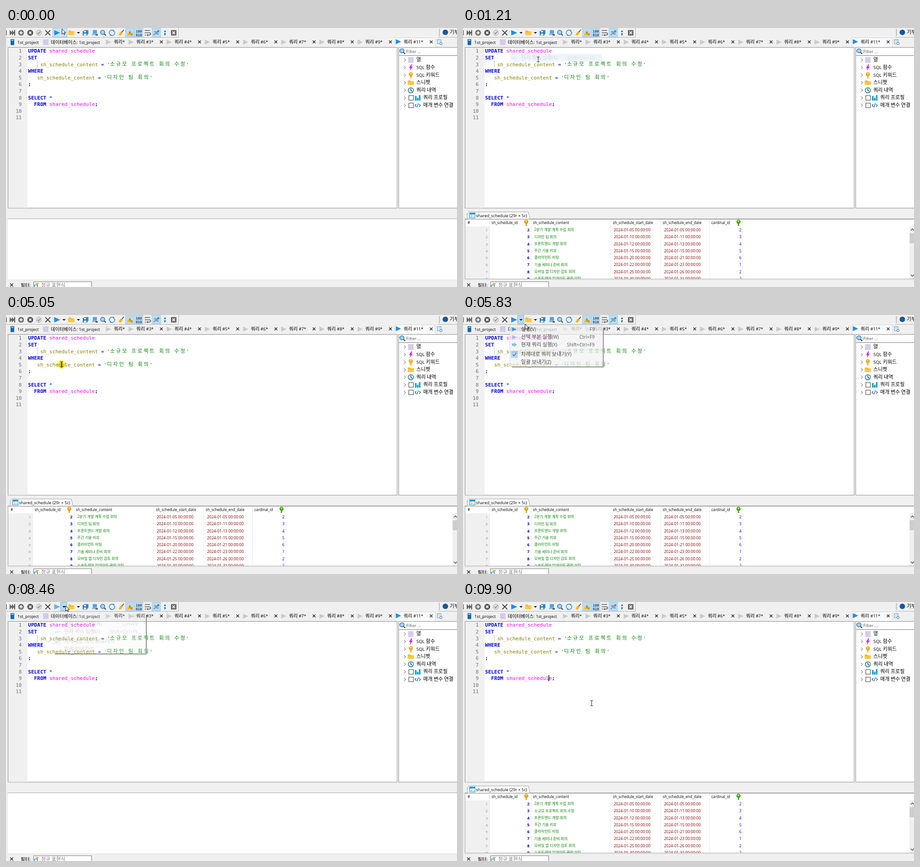
Recreate the animation shown at these times as an HTML page. Size 987 by 568 pixels, loop 9.93 s.

```html
<!DOCTYPE html>
<html lang="ko">
<head>
<meta charset="utf-8">
<title>Query editor</title>
<style>
  html, body { margin: 0; width: 100%; height: 100%; overflow: hidden; background: #f0f0f0; }
  svg { display: block; width: 100%; height: 100%; }
  text { font-family: "Open Sans", "Noto Sans CJK KR", "Noto Sans CJK", sans-serif; white-space: pre; }
  .code { font: 11px "DejaVu Sans Mono", "Noto Sans CJK KR", monospace; letter-spacing: .03px; }
  .kw { font-weight: bold; fill: #0000f0; }
  .op { fill: #0000f0; }
  .tbl { fill: #f0f; }
  .col { fill: #808000; }
  .str { fill: #008000; }
  .ko { font-family: "Noto Sans CJK KR", "Noto Sans CJK", sans-serif; letter-spacing: 3.12px; word-spacing: 1px; }
  .bits { font: bold 7.5px "DejaVu Sans Mono", monospace; }
  #halo { mix-blend-mode: multiply; }
</style>
</head>
<body>
<svg id="stage" viewBox="0 0 987 568"></svg>
<script>
const LOOP = 9930;

// ---------- drawing helpers ----------
const rect = (x, y, w, h, fill, more = '') =>
  `<rect x="${x}" y="${y}" width="${w}" height="${h}" fill="${fill}" ${more}/>`;
const path = (d, fill, stroke = 'none', w = 1) =>
  `<path d="${d}" fill="${fill}" stroke="${stroke}" stroke-width="${w}"/>`;
const line = (d, stroke, w = 1) => path(d, 'none', stroke, w);
const circle = (x, y, r, fill, more = '') =>
  `<circle cx="${x}" cy="${y}" r="${r}" fill="${fill}" ${more}/>`;
const cross = (x, y, r, color, w) =>
  line(`M${x - r} ${y - r}l${2 * r} ${2 * r}m0 ${-2 * r}l${-2 * r} ${2 * r}`, color, w);
const at = (x, y, body) => `<g transform="translate(${x} ${y})">${body}</g>`;
const plain = (x, y, s, size, fill = '#000', more = '') =>
  `<text x="${x}" y="${y}" font-size="${size}" fill="${fill}" ${more}>${s}</text>`;
// Hangul runs are set a little larger than Latin ones
const label = (x, y, s, size = 9.4, fill = '#000', more = '') =>
  plain(x, y, s.replace(/[가-힣]+/g, run => `<tspan font-size="${size * 1.13}">${run}</tspan>`), size, fill, more);

// ---------- icons, centred on 0,0 ----------
const play = (color, s = 1) => path(`M${-6 * s} ${-6 * s}L${7 * s} 0L${-6 * s} ${6 * s}z`, color);
const folder = path('M-6.5-5h5l1.5 2h6.5v8h-13z', '#fbb817') + path('M-6.5-1.5h13v6.5h-13z', '#ffc933');
const stack = [-6, -1.8, 2.4].map(y => rect(-6, y, 12, 3.6, '#cfc4e8')).join('');
const lens = circle(-1, -1, 4.6, '#9fd4f7', 'stroke="#3b6f9e" stroke-width="1.5"') + line('M2.5 2.5L6 6', '#345', 2.2);
const drop = path('M-3.5-1.5h7L0 2z', '#111');
const key = color => circle(0, -2, 4.5, color) + circle(0, -3.2, 1.3, '#fff') + rect(-1.5, 1, 3, 6, color);
const bolt = path('M1-7L-4 1h3L-2 7L4-2H1L3-7z', '#e815e8');
const clock = circle(0, 0, 5.7, '#eaf8fc', 'stroke="#117a9c" stroke-width="1.5"') + line('M0-4V0L3 2', '#234', 1.3);
const checkbox = rect(-5, -5, 10, 10, '#fff', 'stroke="#333"');
const bars = rect(-6, -4, 3.5, 10, '#12a5d0') + rect(-1.7, 0, 3.5, 6, '#12a5d0') + rect(2.6, -6, 3.5, 12, '#12a5d0');
const tags = line('M-3-3L-6 0L-3 3M3-3L6 0L3 3M1.5-4.5L-1.5 4.5', '#1b5fa8', 1.3);
const refresh = line('M-5 3A5.8 5.8 0 0 1 3-5M5-3A5.8 5.8 0 0 1-3 5', '#2289d5', 1.5) +
  path('M1-6.5l4.5 1l-2.5 3.5zM-1 6.500l-4.500-1l2.500-3.500z', '#2289d5');

function toolbar() {
  const on = x => rect(x, .5, 19, 19, '#b9dcf5', 'stroke="#a3d0f2"');
  const icons = [
    [14, line('M5-6V6', '#555', 2) + path('M-6-6L0 0L-6 6zM-1-6L5 0L-1 6z', '#666')],
    [33, circle(0, 0, 6.5, '#777') + line('M-3.5 0h7M0-3.5v7', '#fff', 1.8)],
    [53, circle(0, 0, 6.5, '#555') + cross(0, 0, 2.5, '#fff', 1.8)],
    [72, circle(0, 0, 6, '#ddd', 'stroke="#aaa"') + line('M-3 0L-1 2.5L3.5-3', '#888', 1.5)],
    [91.5, cross(0, 0, 5.5, '#444', 1.8)],
    [143, folder], [158.5, drop],
    [174, rect(-3, -6, 9.5, 9, '#3a94d8') + rect(-6, -4, 10, 10, '#1673bd') + rect(-3.5, -4, 5, 3, '#fff') + rect(-4, 1.5, 6, 4.5, '#d7ecfa')],
    [194, rect(-4, -6, 9, 8, '#4fa5e5') + rect(-6, 2, 10, 3, '#8db4d5') + rect(2, 3, 5, 3, '#357')],
    [212.5, lens],
    [232, refresh],
    [252, line('M6-6.5L1-1', '#8b5a24', 2) + path('M-1-3L3 1L-1 6L-6 5z', '#f4b41f')],
    [271, path('M0-6L6.5 5.5h-13z', '#f9b51b') + rect(-.7, -2, 1.5, 4, '#654') + rect(2, 1, 4, 5, '#e08f14')],
    [309.5, line('M-6-5h12M-6 0h10q3 0 3 2.5T4 5H-1M-6 5h3', '#555', 1.5) + path('M-2 5l3-2.5v5z', '#555')],
    [329, line('M-6 5L6-5M-5-2h5M0 2.5h5', '#456b8d', 1.4) + circle(4, -3, 2, 'none', 'stroke="#456b8d"')],
    [348, circle(0, -3, 2, '#0c8ca5') + path('M-2 1h4q0 4-3 5l-1-1q1-1 1-2h-1z', '#0c8ca5')],
    [367, rect(-6, -6, 12, 12, '#666', 'rx="1"') + cross(0, 0, 2.8, '#fff', 1.8)],
  ];
  const bits = (y, s) => `<text class="bits" x="284" y="${y}" fill="#2c4258">${s}</text>`;
  return rect(0, 5, 1.3, 11, '#555') + on(261.5) + on(280.5) + on(319.5) +
    '<g id="hover">' + rect(102.5, .5, 31, 19, '#cce5f8', 'stroke="#98c9ef"') + '</g>' +
    '<g id="pressed">' + rect(119.5, .5, 14, 19, '#b5d9f5', 'stroke="#86bdea"') + '</g>' +
    `<g id="run">${at(111.5, 10.5, play('#1c8fe3'))}</g>` + at(127, 10.5, drop) +
    icons.map(([x, body]) => at(x, 10.5, body)).join('') + bits(9.5, '100') + bits(17.5, '010') +
    line('M0 20.5H377.5V0M946 20.5H987', '#b5b5b5') +
    line('M948.5 2V18', '#aaa', 1.5) + circle(961.5, 9.5, 6, '#14599f') + label(971, 13, '기부', 9.6);
}

function tabs() {
  let out = rect(851.5, 21.5, 88, 21, '#fafafa', 'stroke="#d5d5d5"');
  out += rect(10, 24.5, 8, 13, '#1668b0', 'rx="1"') + rect(11.5, 26, 5, 2, '#9fd3ff') + label(25, 34.5, '1st_project', 9.2);
  out += at(87, 31, stack) + label(98, 34.5, '데이터베이스: 1st_project', 9.1);
  out += at(224, 31, play('#c9c9c9', .9)) + label(236, 34, '쿼리*', 9.2);
  for (let n = 3; n < 10; n++) {
    const x = 83.55 * (n - 3);
    out += at(273.5 + x, 31, play('#c9c9c9', .9)) + label(285 + x, 34, `쿼리 #${n}*`, 9.2) + cross(340 + x, 30.5, 3, '#222', 1.4);
  }
  return out + at(858.5, 30, play('#1c8fe3', .9)) + label(870, 33.5, '쿼리 #11*', 9.2) + cross(930.5, 30.5, 3, '#222', 1.4) +
    rect(944, 25.5, 8, 9, '#fff', 'stroke="#4a90c8"') + line('M945.5 28h5M945.5 31h5', '#8ab') + circle(952, 34, 2.5, '#fff', 'stroke="#357"');
}

const CELL = 6.65;
const lineY = n => 54.3 + 14.6 * (n - 1);

function editor() {
  const tokens = [
    [1, 0, 'kw', 'UPDATE'], [1, 7, 'tbl', 'shared_schedule'],
    [2, 0, 'kw', 'SET'],
    [3, 4, 'col', 'sh_schedule_content'], [3, 24, 'op', '='], [3, 26, 'str', "'"],
    [3, 27, 'str ko', '소규모 프로젝트 회의 수정'], [3, 52, 'str', "'"],
    [4, 0, 'kw', 'WHERE'],
    [5, 3, 'col', 'sh_schedule_content'], [5, 23, 'op', '='], [5, 25, 'str', "'"],
    [5, 26, 'str ko', '디자인 팀 회의'], [5, 40, 'str', "'"],
    [6, 0, 'kw', ';'],
    [8, 0, 'kw', 'SELECT'], [8, 7, 'op', '*'],
    [9, 2, 'kw', 'FROM'], [9, 7, 'tbl', 'shared_schedule'], [9, 22, 'kw', ';'],
  ];
  let out = rect(4.5, 42.5, 851.5, 352.5, '#fff', 'stroke="#8a8a8a"') + rect(5, 43, 42, 351.5, '#f0f0f0');
  for (let n = 1; n < 12; n++) out += `<text class="code" x="34.5" y="${lineY(n)}" text-anchor="end" fill="#707070">${n}</text>`;
  out += line('M68.5 72V87', '#bbb');
  return out + tokens.map(([n, col, cls, s]) => {
    const rise = cls.includes('ko') ? .8 : 0;
    return `<text class="code ${cls}" x="${48.3 + col * CELL}" y="${lineY(n) - rise}">${s}</text>`;
  }).join('');
}

function sidePanel() {
  const rows = [['열', stack], ['SQL 함수', bolt], ['SQL 키워드', key('#f7a813')], ['스니펫', folder],
    ['쿼리 내역', clock], ['쿼리 프로필', bars, true], ['매개 변수 연결', tags, true]];
  return rect(859.5, 42.5, 140, 352.5, '#fff', 'stroke="#8a8a8a"') + line('M860 60.5H987', '#707070') +
    at(867.5, 51, lens) + label(876, 54.5, 'Filter ...', 9.4, '#555') +
    rows.map(([s, icon, check], i) => {
      const y = 70.2 + 16.6 * i;
      return line(`M871 ${y - 3.5}l3.5 3.5l-3.5 3.5`, '#888', 1.2) +
        (check ? at(886.5, y, checkbox) : '') + at(check ? 901 : 886, y, icon) + label(check ? 913 : 898, y + 3.2, s, 9.8);
    }).join('');
}

function results() {
  const rows = [
    [2, '2분기 개발 계획 수립 회의', '05', '05', 2], [3, '', '10', '11', 3],
    [4, '프론트엔드 개발 회의', '12', '13', 4], [5, '주간 기술 리뷰', '15', '15', 5],
    [6, '클라이언트 미팅', '20', '21', 6], [7, '기술 세미나 준비 회의', '22', '23', 1],
    [8, '모바일 앱 디자인 검토 회의', '25', '26', 2], [9, '소프트웨어 업데이트 관련 미팅', '30', '31', 2],
  ];
  const day = (x, y, d) => plain(x, y, `2024-01-${d} 00:00:00`, 8.5, '#800000');
  const end = 'text-anchor="end"';
  let out = path('M9.5 418.5V407L13 403.5H143L146.5 418.5', '#fff', '#a0a0a0') +
    rect(14.5, 405.5, 12, 11, '#fff', 'stroke="#1679b8"') + rect(14, 405, 13, 4, '#19a0dc') + line('M18.5 409V417M14 413H27', '#7bb8dd') +
    plain(28.5, 415, 'shared_schedule (29r × 5c)', 9.05) +
    rect(4.5, 419.5, 984, 131, '#fff', 'stroke="#a0a0a0"') + rect(5, 435, 53, 115, '#f0f0f0') +
    line('M58.5 420V550M150.5 420V550M323.5 420V550M432.5 420V550M539.5 420V550M612.5 420V550', '#ececec') +
    [[10, '#'], [62.5, 'sh_schedule_id'], [153, 'sh_schedule_content'], [328, 'sh_schedule_start_date'],
      [437, 'sh_schedule_end_date'], [543.5, 'cardinal_id']].map(([x, s]) => plain(x, 430.3, s, 8.15)).join('') +
    at(138.5, 427, key('#f0a010')) + at(603, 427, key('#4aa814'));
  out += '<g clip-path="url(#gridClip)">' + rows.map(([id, s, from, to, ref], i) => {
    const y = 446.1 + 15.25 * i;
    return plain(54, y, i + 1, 8, '#888', end) + plain(145.5, y, id, 8.8, '#0000d0', end + ' font-weight="bold"') +
      `<text ${i === 1 ? 'id="edited"' : ''} x="156" y="${y - .7}" font-size="8.05" fill="#008000">${s}</text>` +
      day(330, y, from) + day(440, y, to) + plain(609.5, y, ref, 8.8, '#0000e0', end);
  }).join('') + '</g>';
  return out + rect(977, 435, 10, 115, '#f0f0f0') + rect(977.5, 450, 10, 22, '#cdcdcd') +
    line('M980 444l3.5-3.5l3.5 3.5M980 541l3.5 3.5l3.5-3.5', '#444', 1.3);
}

const lower = rect(2.5, 418.5, 990, 134, '#fff', 'stroke="#dcdcdc"') + line('M4 418.5H987', '#a5a5a5');
const filterBar = rect(0, 553, 987, 15, '#f0f0f0') + cross(12.5, 563.5, 3.3, '#222', 1.4) + label(32, 567.5, '필터:', 9.5) +
  rect(60.5, 556.5, 127, 20, '#fff', 'stroke="#7a7a7a"') + path('M64 559h9l-3.5 4v5h-2v-5z', '#f5b13d') +
  rect(62.5, 563.5, 6, 6, '#fff', 'stroke="#1a9ad6" stroke-width="1.5"') + label(77, 567.8, '정규 표현식', 9.7, '#777');

// ---------- menu ----------
const ITEMS = [[31.5, '실행(V)', 'F9'], [48.5, '선택 부분 실행(W)', 'Ctrl+F9'], [65, '현재 쿼리 실행(X)', 'Shift+Ctrl+F9'],
  [86.5, '차례대로 쿼리 보내기(Y)', ''], [103.5, '일괄 보내기(Z)', '']];
const itemText = ([y, s, hint]) => label(127, y + 3.8, s, 10) + plain(288, y + 3.8, hint, 10.1, '#111', 'text-anchor="end"');
const itemBack = y => rect(104, y - 8.5, 200, 17, '#91c9f7');
const arrowIcon = at(112, 65, path('M-5-2.5H0V-5L6 0L0 5V2.5H-5z', '#5a9fdc'));
const menu = '<g id="menu">' + line('M307 28V114.5', '#8c8c8c', 2) + line('M107 114H308', '#8c8c8c', 2) +
  '<g id="sheet">' + rect(102.5, 22.5, 203.5, 90.5, '#f2f2f2', 'stroke="#ccc"') + `<g id="pick">${itemBack(0)}</g>` +
  line('M126 76.5H303', '#d0d0d0') + at(112, 31.5, play('#1c8fe3', .8)) + at(112, 48.5, play('#8ab8dd', .8)) + arrowIcon +
  rect(105, 79, 15, 15, '#90c8f6') + line('M108.5 86.5l3 3l5-6', '#222', 1.4) +
  ITEMS.map(itemText).join('') + '</g></g>' +
  `<g id="ghost">${itemBack(65)}${arrowIcon}${itemText(ITEMS[2])}</g>`;

const pointer = path('M.5.5V12L3.3 9.5L5.2 13.5L7 12.7L5.2 8.8H8.7z', '#fff', '#111');
const beam = line('M-2.5-5.5H3.5M.5-5.500V5.500M-2.500 5.500H3.500', '#222', 1);

document.getElementById('stage').innerHTML =
  '<defs><clipPath id="gridClip"><rect x="5" y="435" width="972" height="115"/></clipPath></defs>' +
  rect(0, 0, 987, 568, '#f0f0f0') + toolbar() + tabs() + editor() + sidePanel() + lower +
  `<g id="results">${results()}</g>` + filterBar +
  rect(0, 0, 1.6, 13, '#000', 'id="caret"') + menu +
  circle(0, 0, 9.5, '#fff23c', 'id="halo"') + `<g id="pointer">${pointer}</g><g id="beam">${beam}</g>`;

// ---------- timeline (ms) ----------
const ROUTE = [
  [0, 122, 1.5], [40, 122, 1.5], [250, 128, 8], [330, 130, 9], [680, 170, 62], [930, 170, 62], [1210, 164, 69],
  [1400, 252, 352], [1630, 252, 352], [1680, 251, 357], [2400, 251, 357], [2700, 314, 400], [2950, 290, 450],
  [3200, 212, 471], [3320, 205, 470.5], [3400, 205, 470.5], [3560, 270, 250], [3730, 232, 60], [3880, 232, 60],
  [4200, 150, 8], [4420, 126, 4], [4780, 126, 4], [4940, 121, 108.5], [5160, 121, 108.5], [5320, 82, 92],
  [5560, 127, 8], [5740, 128, 10], [6080, 170, 64], [6280, 170, 64], [6500, 218, 280], [6720, 250, 245],
  [6890, 250, 245], [7160, 188, 167], [7340, 188, 167], [7850, 126, 6], [7950, 126, 6], [8300, 130, 8],
  [8500, 130, 8], [8850, 170, 64], [8990, 170, 64], [9280, 232, 270], [9420, 232, 270], [9880, 281, 222], [LOOP, 281, 222],
];
const MENUS = [[300, 930], [5690, 6230], [8430, 8960]];
const CLICKS = [5010, 7210];
const CARETS = [ // from, to, x, y
  [1640, 2170, 81, 160.5], [2700, 3230, 81, 160.5], [3730, 4260, 81, 160.5], [4790, 5000, 81, 160.5],
  [5000, 5530, 121, 102], [6940, 7200, 121, 102], [7200, 7730, 187, 160.5], [8260, 8430, 187, 160.5], [9670, LOOP, 187, 160.5],
];

const el = id => document.getElementById(id);
const show = (id, on) => { el(id).style.display = on ? '' : 'none'; };
const move = (id, x, y) => el(id).setAttribute('transform', `translate(${x} ${y})`);
const within = (t, [from, to]) => t >= from && t < to;

function cursorAt(t) {
  const i = ROUTE.findIndex(p => p[0] > t);
  const [t0, x0, y0] = ROUTE[i - 1], [t1, x1, y1] = ROUTE[i];
  const k = (t - t0) / (t1 - t0), e = k * k * (3 - 2 * k);
  return [x0 + (x1 - x0) * e, y0 + (y1 - y0) * e];
}

function draw(t) {
  const [x, y] = cursorAt(t);
  const open = MENUS.find(m => within(t, m));
  const inEditor = !open && y > 43 && y < 396;
  show('beam', inEditor);
  show('pointer', !inEditor);
  move(inEditor ? 'beam' : 'pointer', x, y);

  show('hover', !open && y < 20 && x > 101 && x < 134);
  show('pressed', open);
  el('run').style.opacity = within(t, [6250, 9050]) ? .62 : 1;

  show('menu', open);
  if (open) {
    el('sheet').style.opacity = Math.min(1, (t - open[0]) / 200);
    const item = ITEMS.find(([mid]) => Math.abs(y - mid) <= 8.5);
    show('pick', item);
    if (item) move('pick', 0, item[0]);
  }
  const since = Math.min(...MENUS.map(m => t - m[1]).filter(d => d >= 0));
  show('ghost', since < 440);
  el('ghost').style.opacity = Math.max(.15, 1 - since / 220);

  show('results', within(t, [1080, 6380]) || t >= 9110);
  el('edited').textContent = t < 8000 ? '디자인 팀 회의' : '소규모 프로젝트 회의 수정';

  const caret = CARETS.find(c => within(t, c));
  show('caret', caret);
  if (caret) move('caret', caret[2], caret[3]);

  const click = CLICKS.some(c => within(t, [c - 30, c + 130]));
  show('halo', click);
  if (click) move('halo', x, y);
}

function tick() {
  draw(performance.now() % LOOP);
  requestAnimationFrame(tick);
}
tick();
</script>
</body>
</html>
```
